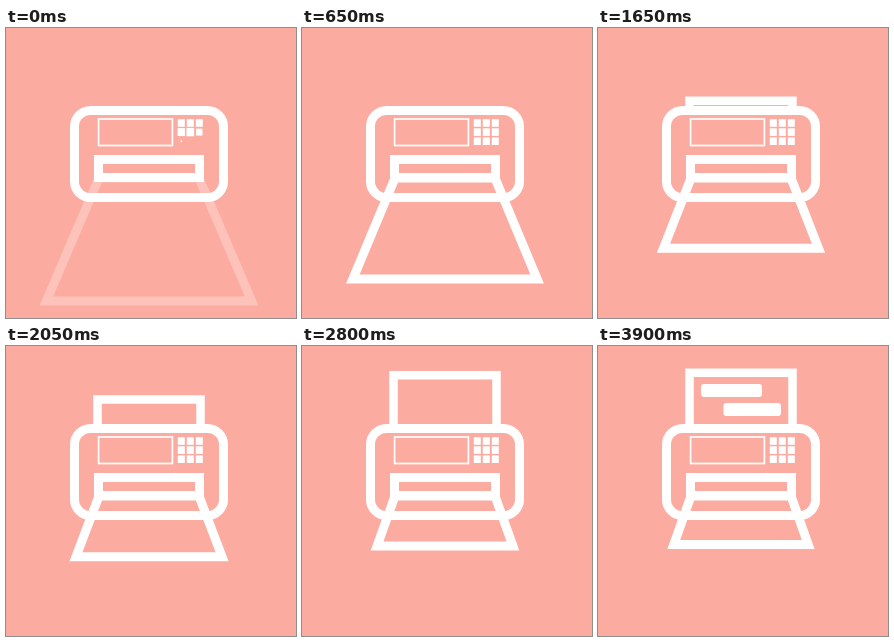
Animation of 290x290 px, one loop 4000 ms. Source, as an HTML page:

```html
<!DOCTYPE html>
<html lang="en">
<head>
<meta charset="utf-8">
<title>Printer</title>
<style>
  html, body { margin: 0; width: 100%; height: 100%; overflow: hidden; background: #fcaba0; }
  svg { display: block; width: 100%; height: 100%; }
  .line { fill: none; stroke: #fff; stroke-width: 9; }
  .solid { fill: #fff; }
</style>
</head>
<body>
<svg viewBox="0 0 290 290">
  <clipPath id="above"><rect width="290" height="82"/></clipPath>
  <g clip-path="url(#above)">
    <rect id="paper" class="line" x="91.5" width="103" height="150" style="stroke-width:8.5"/>
  </g>
  <rect id="bar1" class="solid" x="103" y="38" height="13" rx="3"/>
  <rect id="bar2" class="solid" x="125.5" y="57" height="13" rx="3"/>
  <path id="tray" class="line"/>
  <rect class="line" x="68.5" y="82.5" width="149" height="87" rx="16"/>
  <rect class="line" x="92.5" y="131.5" width="101" height="18"/>
  <rect class="line" x="92.6" y="91" width="73.8" height="26.5" style="stroke-width:1.7"/>
  <g id="keys"></g>
</svg>
<script>
const LOOP = 4000;
const CENTER = 143;
const byId = id => document.getElementById(id);
const [paper, bar1, bar2, tray, keyPad] = ['paper', 'bar1', 'bar2', 'tray', 'keys'].map(byId);

const clamp = v => Math.min(1, Math.max(0, v));
const progress = (t, start, end) => clamp((t - start) / (end - start));
const sineInOut = p => (1 - Math.cos(Math.PI * p)) / 2;
const backOut = p => p <= 0 ? 0 : 1 + 2.7 * (p - 1) ** 3 + 1.7 * (p - 1) ** 2;

const keys = Array.from({ length: 9 }, (_, i) => {
  const el = document.createElementNS('http://www.w3.org/2000/svg', 'rect');
  el.setAttribute('class', 'solid');
  keyPad.append(el);
  return { el, x: 175.3 + 9 * (i % 3), y: 95 + 9.1 * Math.floor(i / 3), start: (i - 6) * 50 - 10 };
});

function set(el, attrs) {
  for (const name in attrs) el.setAttribute(name, attrs[name]);
}

function drawTray(t) {
  const out = 2 * (1 - sineInOut(progress(t, -2400, 3200)));
  const bottom = 198.5 + 61 * out;
  const half = 67.2 + 29 * out;
  set(tray, {
    d: `M${CENTER - 50} 150H${CENTER + 50}L${CENTER + half} ${bottom}H${CENTER - half}Z`,
    opacity: clamp(0.28 + t / 500)
  });
}

function drawKeys(t) {
  for (const { el, x, y, start } of keys) {
    const s = backOut(progress(t, start, start + 200));
    const w = 7 * s, h = 7.6 * s;
    set(el, { x: x - w / 2, y: y - h / 2, width: w, height: h });
  }
  const pulse = 1 + 0.24 * Math.sin(Math.PI * progress(t, 3300, 3800));
  set(keyPad, { transform: `translate(184.3 104.1) scale(${pulse}) translate(-184.3 -104.1)` });
}

function render(t) {
  drawTray(t);
  drawKeys(t);
  set(paper, { y: 26.8 + 92 * (1 - sineInOut(progress(t, 200, 3100))) });
  set(bar1, { width: 61 * sineInOut(progress(t, 3300, 3900)) });
  set(bar2, { width: 57.5 * sineInOut(progress(t, 3300, 3800)) });
}

const origin = performance.now();
function tick() {
  const t = (performance.now() - origin) % LOOP;
  const step = t < 3800 ? 50 : 100;
  render(Math.floor(t / step) * step);
  requestAnimationFrame(tick);
}
tick();
</script>
</body>
</html>
```
